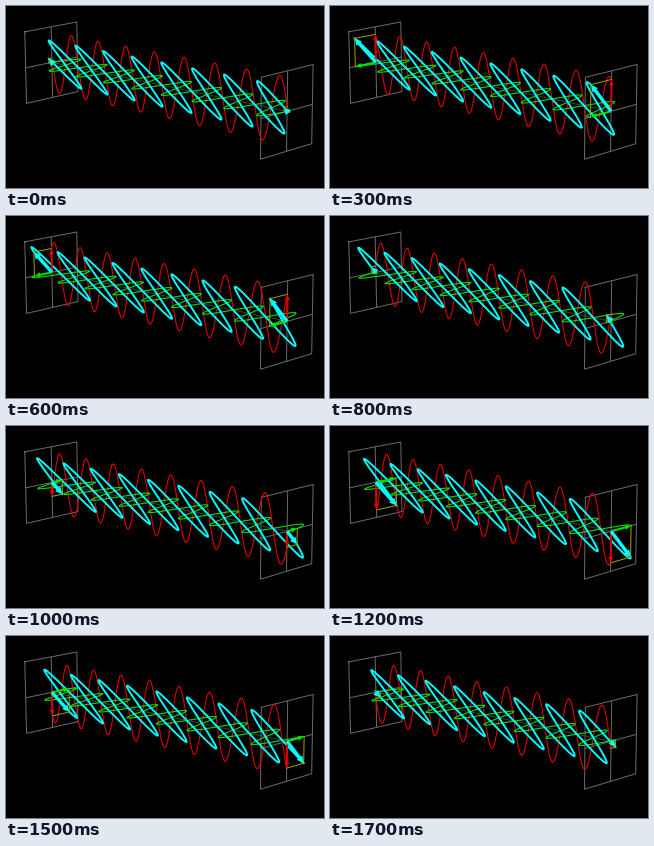
Recreate the animation shown at these times as a matplotlib script. Size 318 by 182 pixels, loop 1.8 s.

```python
import numpy as np
import matplotlib.pyplot as plt
from matplotlib.animation import FuncAnimation

W, H, DPI = 318, 182, 100
FRAMES, STEP_MS = 18, 100
CYCLES = 8
AMP = 0.85
PHASE = np.radians(8)

RED, GREEN, CYAN = "#e00000", "#00e000", "#00ffff"
GRAY, OLIVE = "#6a6a6a", "#a0a000"

# Perspective: far and near panel centres, panel axes and depth terms
FAR, NEAR = np.array([45.4, 55.8]), np.array([280.6, 104.8])
RIGHT, UP = np.array([30.5, -5.3]), np.array([-1.1, -40.9])
FAR_DEPTH, RIGHT_DEPTH, UP_DEPTH = 1.15, 0.017, -0.006


def project(u, h, v):
    """Screen points for u along the beam (0..1), h across and v up (-1..1)."""
    u, h, v = np.broadcast_arrays(*(np.asarray(a, float) for a in (u, h, v)))
    far = FAR_DEPTH * (1 - u)
    depth = far + u + RIGHT_DEPTH * h + UP_DEPTH * v
    parts = ((far, FAR), (u, NEAR), (h, RIGHT), (v, UP))
    return sum(k[..., None] * p for k, p in parts) / depth[..., None]


def px(width):
    return width * 72 / DPI


def arrow_shape(start, tip, shaft, head_w, head_len):
    """Outline of a filled arrow whose head keeps its size when it is short."""
    d = tip - start
    length = max(np.hypot(*d), 1e-6)
    d = d / length
    n = np.array([-d[1], d[0]])
    neck = tip - d * head_len
    tail = start if length > head_len else neck
    return np.array([
        tail + n * shaft / 2, neck + n * shaft / 2, neck + n * head_w / 2, tip,
        neck - n * head_w / 2, neck - n * shaft / 2, tail - n * shaft / 2])


fig = plt.figure(figsize=(W / DPI, H / DPI), dpi=DPI, facecolor="black")
ax = fig.add_axes([0, 0, 1, 1])
ax.set_xlim(-0.5, W - 0.5)
ax.set_ylim(H - 0.5, -0.5)
ax.axis("off")


def add_line(color, width, z, pts=((0, 0),)):
    x, y = np.asarray(pts).T
    return ax.plot(x, y, color=color, lw=px(width), zorder=z)[0]


for end in (0, 1):
    add_line(GRAY, 1, 1, project(end, [-1, 1, 1, -1, -1], [1, 1, -1, -1, 1]))
    add_line(GRAY, 1, 1, project(end, [-1, 1], [0, 0]))
    add_line(GRAY, 1, 1, project(end, [0, 0], [-1, 1]))
add_line("#404040", 1, 1, project([0, 1], 0, 0))

# Each component: (across, up) direction, colour, wave width, arrow sizes
PARTS = [
    ((0, 1), RED, 1.1, (2, 5, 6)),
    ((-1, 0), GREEN, 1.1, (2, 5, 6)),
    ((-1, 1), CYAN, 1.9, (3.4, 7, 7)),
]

beam = np.linspace(0, 1, 1600)
waves = [add_line(color, width, 2 + i)
         for i, (_, color, width, _) in enumerate(PARTS)]
boxes = [add_line(OLIVE, 1, 5) for _ in range(2)]
arrows = [[ax.fill([0], [0], color=color, lw=0, zorder=6 + i)[0]
           for i, (_, color, _, _) in enumerate(PARTS)] for _ in range(2)]


def draw(frame):
    angle = 2 * np.pi * frame / FRAMES + PHASE
    swing = AMP * np.sin(angle - 2 * np.pi * CYCLES * beam)
    for wave, ((h, v), *_) in zip(waves, PARTS):
        wave.set_data(*project(beam, h * swing, v * swing).T)

    s = AMP * np.sin(angle)
    for end in (0, 1):
        boxes[end].set_data(*project(end, [0, -s, -s], [s, s, 0]).T)
        origin = project(end, 0, 0)
        for arrow, ((h, v), _, _, size) in zip(arrows[end], PARTS):
            tip = project(end, h * s, v * s)
            arrow.set_xy(arrow_shape(origin, tip, *size))
    return waves + boxes + arrows[0] + arrows[1]


anim = FuncAnimation(fig, draw, frames=FRAMES, interval=STEP_MS,
                     repeat=True, repeat_delay=0, blit=False)
plt.show()
```
